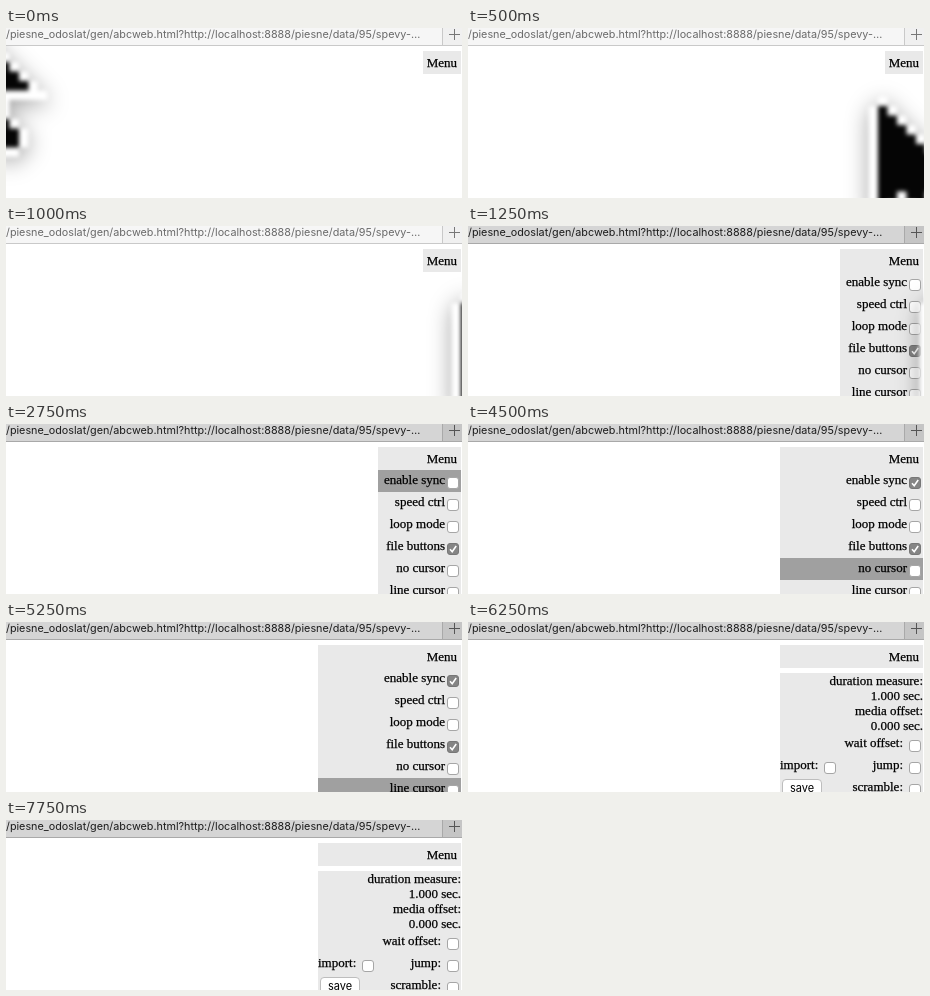
An HTML page with a canvas for the animation above (8000 ms loop, 456x170 px).

```html
<!DOCTYPE html>
<html lang="sk">
<head>
<meta charset="utf-8">
<title>Menu</title>
<style>
html, body { margin: 0; width: 100%; height: 100%; overflow: hidden; background: #fff; }
canvas { display: block; }
</style>
</head>
<body>
<canvas id="stage" width="456" height="170"></canvas>
<script>
const ctx = document.getElementById('stage').getContext('2d');
const LOOP = 8000;
const PANEL = '#e9e9e9';
const SERIF = '13px "Liberation Serif", serif';
const ADDRESS = '/piesne_odoslat/gen/abcweb.html?http://localhost:8888/piesne/data/95/spevy-…';
const OPTIONS = ['enable sync', 'speed ctrl', 'loop mode', 'file buttons', 'no cursor', 'line cursor'];

// Enlarged pointer: [start, tip x, tip y]; null hides it.
const POINTER = [
  [0, -63, -23], [250, 304, 85], [500, 410, 78], [750, 447, 77], [1000, 455, 77],
  [1250, 461, 77], [2000, 459, 80], [2250, 466, 84], [2500, 468, 84], [2750, null],
  [3750, 439, 159], [4000, 465, 196], [5250, null]
];
const CELL = 9.5;
const WING_ROWS = 9;

function rect(color, x, y, w, h) {
  ctx.fillStyle = color;
  ctx.fillRect(x, y, w, h);
}

function text(label, x, y, align = 'right', font = SERIF, color = '#000') {
  ctx.font = font;
  ctx.textAlign = align;
  ctx.fillStyle = color;
  ctx.fillText(label, x, y);
  if (font !== SERIF) return;
  ctx.strokeStyle = color;
  ctx.lineWidth = .25;
  ctx.strokeText(label, x, y);
}

function roundBox(x, y, w, h, radius, fill, line) {
  ctx.beginPath();
  ctx.roundRect(x + .5, y + .5, w - 1, h - 1, radius);
  ctx.fillStyle = fill;
  ctx.fill();
  ctx.strokeStyle = line;
  ctx.lineWidth = 1;
  ctx.stroke();
}

function checkbox(x, y, checked) {
  roundBox(x, y, 12, 12, 2.5, checked ? '#858585' : '#fff', checked ? '#777' : '#a6a6a6');
  if (!checked) return;
  ctx.beginPath();
  ctx.moveTo(x + 3, y + 6.3);
  ctx.lineTo(x + 5.2, y + 8.7);
  ctx.lineTo(x + 9.2, y + 3);
  ctx.strokeStyle = '#fff';
  ctx.lineWidth = 1.6;
  ctx.stroke();
}

function addressBar(active) {
  const line = active ? '#a9a9a9' : '#c9c9c9';
  const ink = active ? '#1c1c1c' : '#6a6a6a';
  rect(active ? '#d5d5d5' : '#f6f6f6', 0, 0, 456, 17);
  rect(active ? '#c5c5c5' : '#f0f0f0', 437, 0, 19, 17);
  rect(line, 436, 0, 1, 17);
  rect(line, 0, 17, 456, 1);
  text(ADDRESS, 0, 10, 'left', '10.81px Inter, sans-serif', ink);
  const plus = active ? '#555' : '#777';
  rect(plus, 443, 6, 11, 1);
  rect(plus, 448, 1, 1, 11);
}

function optionMenu(t) {
  const left = t < 3000 ? 372 : 312;
  rect(PANEL, left, 23, 455 - left, 147);
  text('Menu', 451, 39);
  const hovered = t < 2000 ? -1 : t < 3750 ? 0 : t < 5250 ? 4 : 5;
  if (hovered >= 0) rect('#a0a0a0', left, 46 + hovered * 22, 455 - left, 22);
  OPTIONS.forEach((label, i) => {
    text(label, 439, 60 + i * 22);
    checkbox(441, 53 + i * 22, i === 3 || (i === 0 && t >= 3250));
  });
}

function syncPanel() {
  rect(PANEL, 312, 23, 143, 23);
  rect(PANEL, 312, 51, 143, 119);
  text('Menu', 451, 39);
  ['duration measure:', '1.000 sec.', 'media offset:', '0.000 sec.']
    .forEach((label, i) => text(label, 455, 63 + i * 15));
  ['wait offset:', 'jump:', 'scramble:'].forEach((label, i) => {
    text(label, 435, 125 + i * 22);
    checkbox(441, 118 + i * 22, false);
  });
  text('import:', 312, 147, 'left');
  checkbox(356, 140, false);
  roundBox(314, 157, 40, 18, 3.5, '#fff', '#bdbdbd');
  text('save', 334, 170, 'center', '11px Inter, sans-serif');
}

// Cells of the arrow as [row, first column, width].
function arrowCells() {
  const cells = [];
  for (let row = 0; row < WING_ROWS; row++) cells.push([row, 0, row + 1]);
  cells.push([WING_ROWS, 0, 2], [WING_ROWS + 1, 0, 1]);
  for (let row = WING_ROWS; row < 15; row++) {
    cells.push([row, 3 + Math.floor((row - 8) * .6), 2]);
  }
  return cells;
}
const ARROW = arrowCells();

function pointer(x, y) {
  const addCells = (row, col, width, height = 1) =>
    ctx.rect(x + col * CELL, y + row * CELL, width * CELL, height * CELL);
  ctx.save();
  ctx.filter = 'blur(2px)';

  ctx.save();
  ctx.shadowColor = 'rgba(0,0,0,.36)';
  ctx.shadowBlur = 22;
  ctx.shadowOffsetY = 5;
  ctx.fillStyle = '#fff';
  ctx.beginPath();
  for (const [row, col, width] of ARROW) {
    addCells(row, col - 1, width + 2);
    addCells(row - 1, col, width, 3);
  }
  addCells(WING_ROWS, 0, WING_ROWS + 2);
  ctx.fill();
  ctx.restore();

  ctx.fillStyle = '#050505';
  ctx.beginPath();
  for (const cells of ARROW) addCells(...cells);
  ctx.fill();
  ctx.restore();
}

function draw(t) {
  rect('#fff', 0, 0, 456, 170);
  addressBar(t >= 1250);
  if (t < 1250) {
    rect(PANEL, 417, 23, 38, 23);
    text('Menu', 451, 39);
  } else if (t < 5500) {
    optionMenu(t);
  } else {
    syncPanel();
  }
  const [, x, y] = POINTER.findLast(([start]) => t >= start);
  if (x !== null) {
    ctx.save();
    ctx.beginPath();
    ctx.rect(0, 18, 456, 152);
    ctx.clip();
    pointer(x, y);
    ctx.restore();
  }
}

function frame() {
  draw(performance.now() % LOOP);
  requestAnimationFrame(frame);
}
frame();
</script>
</body>
</html>
```
